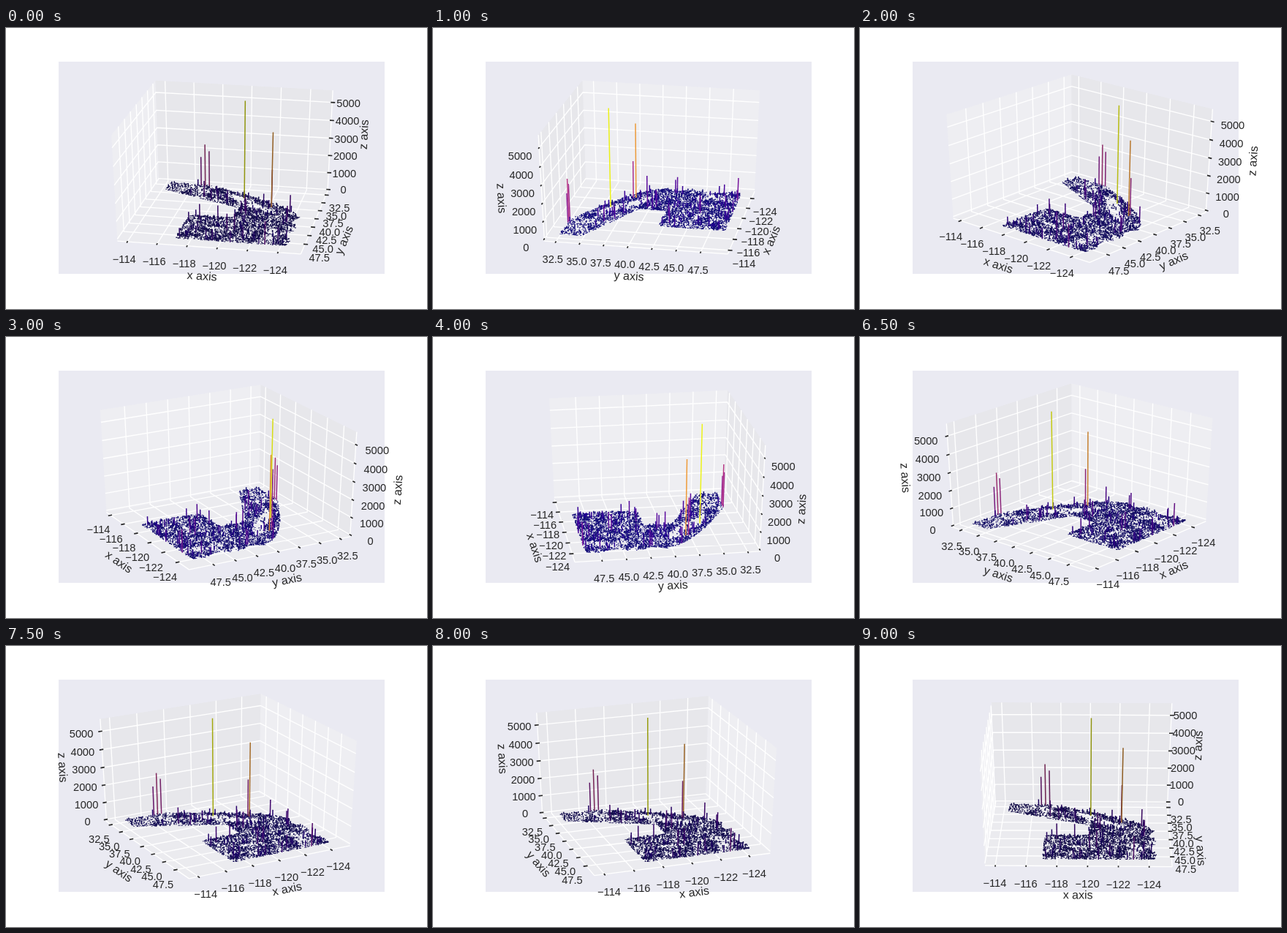
Animation of 576x384 px, one loop 9500 ms. Source, as an HTML page:

```html
<!DOCTYPE html>
<html lang="en">
<head>
<meta charset="utf-8">
<title>Rotating 3D bar chart</title>
<style>
  html, body { margin: 0; width: 100%; height: 100%; overflow: hidden; background: #fff; }
  svg { display: block; font-family: "Liberation Sans", Arial, sans-serif; }
</style>
</head>
<body>
<svg id="stage" width="576" height="384" viewBox="0 0 576 384"></svg>
<script>
const stage = document.getElementById('stage');
const STEP = 500;
const range = (from, to, by = 1) =>
  Array.from({ length: Math.floor((to - from) / by + 1.001) }, (_, i) => from + i * by);
const ANGLES = [10, 11, 1, ...range(12, 19), ...range(2, 9)].map(n => 10 * n + 1);

// Axes run over a unit cube centred on the origin
const AXES = [
  { name: 'x axis', pane: '#eeeef2', mid: -119.41, span: 11.68, ticks: range(-124, -114, 2), digits: 0, ends: 1, tickDir: 1 },
  { name: 'y axis', pane: '#e7e7eb', mid: 40.78, span: 18.2, ticks: range(32.5, 47.5, 2.5), digits: 1, ends: 0, tickDir: 0 },
  { name: 'z axis', pane: '#ebebef', mid: 2773, span: 5546, ticks: range(0, 5000, 1000), digits: 0, ends: 0, tickDir: 0 }
];
const HALF = 0.5 + 1 / 48;
const TICK_PAD = 0.0833, NAME_PAD = 0.181;
const unit = (axis, value) => (value - AXES[axis].mid) / AXES[axis].span;

// Perspective camera at elevation 30 degrees, distance 10
function camera(degrees) {
  const a = degrees * Math.PI / 180, c = Math.cos(a), s = Math.sin(a);
  const sinE = 0.5, cosE = Math.sqrt(0.75);
  return {
    c, s,
    depth: p => c * p.x + s * p.y,
    project([x, y, z]) {
      const h = c * x + s * y;
      const d = 10 - cosE * h - sinE * z;
      return [301.2 + 2413 * (c * y - s * x) / d, 187.1 - 1567 * (cosE * z - sinE * h) / d];
    }
  };
}

let seed = 20;
function random() {
  seed = (seed + 0x6D2B79F5) | 0;
  let t = Math.imul(seed ^ seed >>> 15, 1 | seed);
  t = t + Math.imul(t ^ t >>> 7, 61 | t) ^ t;
  return ((t ^ t >>> 14) >>> 0) / 4294967296;
}

// West and east limits of the scattered area at a latitude
const coast = lat => lat > 40.4
  ? -124.3 + 0.2 * Math.sin(1.6 * (lat - 41))
  : -124.3 + 7.2 * Math.pow((40.4 - lat) / 7.9, 1.5);
const inland = lat => lat > 42 ? -117 : Math.min(-114.3, -120 + 1.38 * Math.max(0, 39 - lat));

function density(lon, lat) {
  if (lon < coast(lat) || lon > inland(lat)) return 0;
  const valley = -119.1 - 0.69 * (lat - 35.3);
  if (lat > 35.2 && lat < 40 && Math.abs(lon - valley) < 0.55) return 0.05;
  if (lat > 44.3 && Math.abs(lon + 122.9) < 0.4) return 0.25;
  const clumps = 0.62 + 0.4 * Math.sin(2.3 * lon + 1.1 * lat) * Math.cos(2.1 * lat - 0.8 * lon);
  return lat < 37 && lon > -117.5 ? 0.6 * clumps : clumps;
}

function scatter(count) {
  const points = [];
  while (points.length < count) {
    const lon = -124.7 + 10.5 * random(), lat = 32.5 + 16.5 * random();
    if (random() > density(lon, lat)) continue;
    const height = Math.min(0.17, 0.0055 / Math.sqrt(random()));
    points.push({ x: unit(0, lon), y: unit(1, lat), height });
  }
  return points;
}

const points = scatter(4300);
const dots = points.filter(p => p.height < 0.035);
const peaks = [
  { x: -0.0585, y: -0.265, height: 1 },
  { x: -0.241, y: -0.15, height: 0.768 },
  { x: -0.239, y: -0.166, height: 0.385 },
  { x: -0.306, y: 0.449, height: 0.24 },
  ...range(-1, 1).map(k => ({ x: 0.216 - 0.025 * k, y: -0.451, height: 0.435 - 0.1 * Math.abs(k) + 0.033 * k }))
];
const bars = [...points.filter(p => p.height >= 0.035), ...peaks];

// Plasma colour map as smooth curves
function plasma(t, shade) {
  const rgb = [13 + 540 * t - 310 * t * t, 250 * Math.pow(t, 1.7), 92 + 70 * Math.cos(3.6 * (t - 0.2))];
  return `rgb(${rgb.map(v => Math.round(shade * v))})`;
}

const fix = p => p.map(v => v.toFixed(2)).join(' ');
const withAt = (point, axis, value) => point.map((v, i) => i === axis ? value : v);
const outward = (point, axis, pad) => point.map((v, i) => i === axis ? v : v + Math.sign(v) * pad);

// drop: distance from anchor to baseline, in ems
function label(text, [x, y], size, drop, angle = 0) {
  const turn = angle ? ` transform="rotate(${angle.toFixed(2)} ${fix([x, y])})"` : '';
  return `<text x="${x.toFixed(2)}" y="${(y + drop * size).toFixed(2)}" font-size="${size}"${turn}>${text}</text>`;
}

function drawAxes(cam) {
  const line = pts => 'M' + pts.map(p => fix(cam.project(p))).join('L');
  const far = [cam.c > 0 ? -HALF : HALF, cam.s > 0 ? -HALF : HALF, -HALF];
  const near = far.map(v => -v);
  let panes = '', grid = '', edges = '', ticks = '', texts = '';

  AXES.forEach((axis, i) => {
    const j = (i + 1) % 3, k = (i + 2) % 3;
    const jNear = withAt(far, j, near[j]), kNear = withAt(far, k, near[k]);
    panes += `<path fill="${axis.pane}" d="${line([far, jNear, withAt(jNear, k, near[k]), kNear])}Z"/>`;

    const start = withAt(far, axis.ends, near[axis.ends]);
    const end = withAt(start, i, near[i]);
    edges += line([start, end]);
    const dir = axis.tickDir, out = Math.sign(start[dir]) / 12;
    for (const value of axis.ticks) {
      const u = unit(i, value);
      grid += line([jNear, far, kNear].map(p => withAt(p, i, u)));
      const at = withAt(start, i, u);
      ticks += line([-0.1, 0.2].map(f => withAt(at, dir, at[dir] + f * out)));
      const text = value.toFixed(axis.digits).replace('-', '\u2212');
      texts += label(text, cam.project(outward(at, i, TICK_PAD)), 14.67, 0.74);
    }

    const [x1, y1] = cam.project(start), [x2, y2] = cam.project(end);
    let angle = Math.atan2(y2 - y1, x2 - x1) * 180 / Math.PI;
    if (angle >= 90) angle -= 180;
    if (angle < -90) angle += 180;
    const middle = outward(withAt(start, i, 0), i, NAME_PAD);
    texts += label(axis.name, cam.project(middle), 16, 0.26, angle);
  });

  return panes +
    `<path d="${grid}${edges}" fill="none" stroke="#fff" stroke-width="1.33"/>` +
    `<path d="${ticks}" stroke="#262626" stroke-width="1.67"/>` +
    `<g fill="#262626" text-anchor="middle">${texts}</g>`;
}

function drawBars(cam) {
  const shade = 0.58 + 0.4 * cam.c * cam.c;
  const ends = p => [cam.project([p.x, p.y, -0.5]), cam.project([p.x, p.y, p.height - 0.5])];
  const specks = dots.map(p => {
    const [base, top] = ends(p);
    return `M${fix(base)}h1.5V${top[1].toFixed(2)}h-1.5z`;
  });
  const lines = bars.sort((a, b) => cam.depth(a) - cam.depth(b)).map(p => {
    const [base, top] = ends(p);
    return `<path d="M${fix(base)}L${fix(top)}" stroke="${plasma(p.height, shade)}"/>`;
  });
  return `<path d="${specks.join('')}" fill="rgb(20,14,${Math.round(125 * shade)})"/>` +
    `<g stroke-width="1.5">${lines.join('')}</g>`;
}

let shown = -1;
function render(time) {
  const index = Math.floor(time / STEP) % ANGLES.length;
  if (index === shown) return;
  shown = index;
  const cam = camera(ANGLES[index]);
  stage.innerHTML = '<rect x="72" y="46" width="446" height="290" fill="#eaeaf2"/>' +
    drawAxes(cam) + drawBars(cam);
}

const begin = performance.now();
function tick() {
  render(performance.now() - begin);
  requestAnimationFrame(tick);
}
tick();
</script>
</body>
</html>
```
